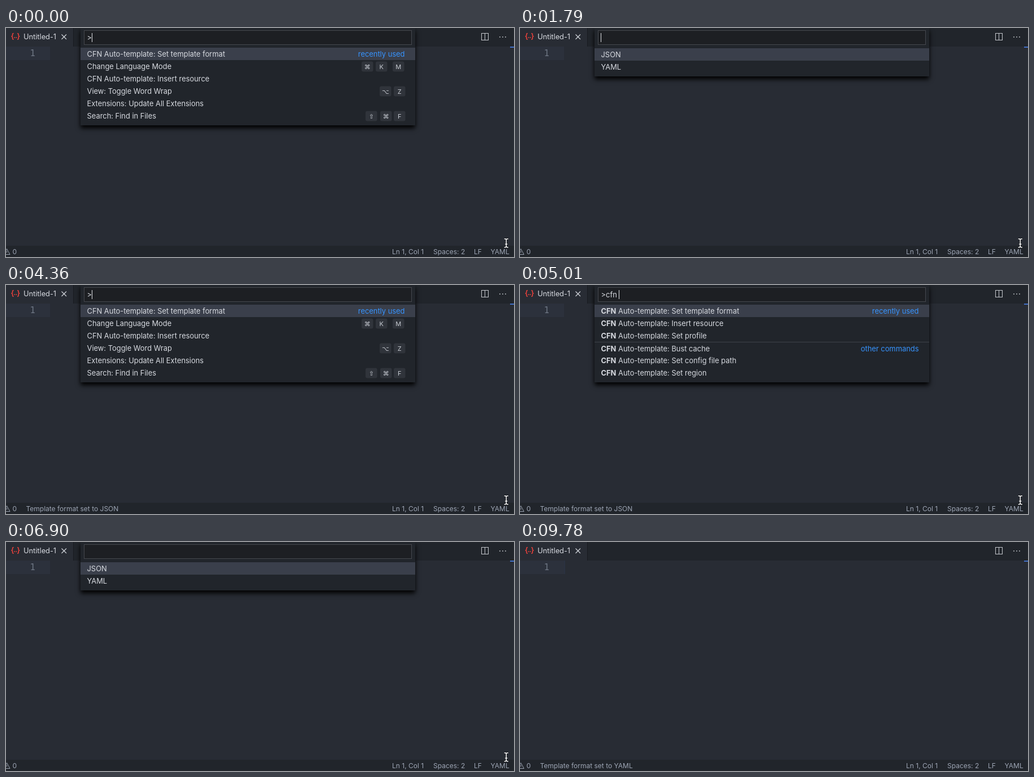
Animation, 900 px wide and 407 px high, one loop 9.88 s. Source, as an HTML page with a canvas:

```html
<!DOCTYPE html>
<html lang="en">
<head>
<meta charset="utf-8">
<title>Command palette</title>
<style>
html, body { margin: 0; width: 100%; height: 100%; overflow: hidden; background: #282c34; }
canvas { display: block; width: 900px; height: 407px; }
</style>
</head>
<body>
<canvas id="stage" width="900" height="407"></canvas>
<script>
const ctx = document.getElementById('stage').getContext('2d');
const LOOP = 9880;
const UI = 'Inter, "Liberation Sans", sans-serif';
const SYMBOL = '"DejaVu Sans", sans-serif';
const MONO = '"DejaVu Sans Mono", monospace';
const C = {
  editor: '#282c34', bar: '#21252b', line: '#2c313c', edge: '#181a1f',
  field: '#1d1f23', fieldEdge: '#45484e', selected: '#3a3f4b', rule: '#3e4249',
  text: '#d7dae0', status: '#9da5b4', link: '#3794ff', caret: '#528bff', key: '#30343b'
};

const CFN = 'CFN Auto-template: ';
const format = { label: CFN + 'Set template format', note: 'recently used' };
const insert = { label: CFN + 'Insert resource' };
const profile = { label: CFN + 'Set profile' };
const bust = { label: CFN + 'Bust cache', note: 'other commands', rule: true };
const language = { label: 'Change Language Mode', keys: [['⌘', 630], ['K', 655], ['M', 685]] };
const search = { label: 'Search: Find in Files', keys: [['⇧', 637], ['⌘', 663], ['F', 687]] };

const START = [
  format, language, insert,
  { label: 'View: Toggle Word Wrap', keys: [['⌥', 662], ['Z', 687]] },
  { label: 'Extensions: Update All Extensions' },
  search
];
const FIRST = [format, language, insert, search, profile, bust];
const MATCHED = [
  format, insert, profile, bust,
  { label: CFN + 'Set config file path' },
  { label: CFN + 'Set region' }
];

function rect(x, y, w, h, color) {
  ctx.fillStyle = color;
  ctx.fillRect(x, y, w, h);
}

function text(str, x, y, { size = 12.9, weight = 400, color = C.text, family = UI, align = 'left' } = {}) {
  ctx.font = `${weight} ${size}px ${family}`;
  ctx.textAlign = align;
  ctx.fillStyle = color;
  ctx.fillText(str, x, y);
  return ctx.measureText(str).width;
}

function stroke(points, color, width = 1) {
  ctx.beginPath();
  points.forEach(([x, y], i) => i ? ctx.lineTo(x, y) : ctx.moveTo(x, y));
  ctx.strokeStyle = color;
  ctx.lineWidth = width;
  ctx.stroke();
}

function dot(x, y, r, color) {
  ctx.beginPath();
  ctx.arc(x, y, r, 0, Math.PI * 2);
  ctx.fillStyle = color;
  ctx.fill();
}

function drawTabs() {
  rect(0, 0, 900, 33, C.bar);
  rect(0, 0, 119, 33, C.editor);
  rect(119, 0, 1, 33, C.edge);
  const brace = { size: 13, weight: 600, color: '#ee423c' };
  text('{', 8.5, 18.5, brace);
  text('}', 19.2, 18.5, brace);
  dot(15.2, 17, 0.9, brace.color);
  dot(18.2, 17, 0.9, brace.color);
  text('Untitled-1', 31, 20, { size: 12.8 });
  stroke([[98.5, 11.5], [107, 20]], C.text, 1.1);
  stroke([[107, 11.5], [98.5, 20]], C.text, 1.1);
  ctx.strokeStyle = '#c5c8cd';
  ctx.lineWidth = 1;
  ctx.strokeRect(842.5, 9.5, 12, 12);
  stroke([[848.5, 9], [848.5, 22]], '#c5c8cd');
  for (const x of [875, 880, 885]) dot(x, 16, 0.9, '#c5c8cd');
}

function drawStatus(message) {
  const style = { size: 12, color: C.status };
  rect(0, 387, 900, 20, C.bar);
  stroke([[-4, 402.5], [1.5, 392.5], [7, 402.5], [-4, 402.5]], C.status);
  stroke([[1.5, 396], [1.5, 399.5]], C.status);
  text('0', 11.5, 402, style);
  text(message, 35.5, 402, style);
  text('Ln 1, Col 1', 684, 402, style);
  text('Spaces: 2', 757, 402, style);
  text('LF', 829, 402, style);
  text('YAML', 858.5, 402, style);
}

function drawEditor(caret) {
  rect(0, 0, 900, 407, C.editor);
  rect(0, 33, 78, 24, C.line);
  text('1', 42.5, 50, { size: 15.5, color: '#6f7785', family: MONO });
  rect(893, 33, 7, 2, '#4270c8');
  ctx.globalAlpha = caret;
  rect(78, 33, 2, 24, C.caret);
  ctx.globalAlpha = 1;
}

function drawKey([glyph, x], y) {
  ctx.beginPath();
  ctx.roundRect(x, y + 2.5, 20.5, 18, 3);
  ctx.fillStyle = C.key;
  ctx.fill();
  const family = glyph > 'Z' ? SYMBOL : UI;
  text(glyph, x + 10.3, y + 15.5, { size: 11, family, align: 'center', color: '#c8ccd3' });
}

// Splits a label into plain and bold runs for the typed words.
function runs(label, query) {
  const [word, rest = ''] = query.split(' ');
  const marks = [[label.toLowerCase().indexOf(word), word.length]];
  if (rest) marks.push([label.indexOf('-' + rest) + 1, rest.length]);
  const out = [];
  let end = 0;
  for (const [at, n] of marks) {
    out.push([label.slice(end, at), 400], [label.slice(at, at + n), 700]);
    end = at + n;
  }
  return [...out, [label.slice(end), 400]];
}

function drawRow(item, y, query) {
  if (item.rule && query) {
    rect(132, y, 593, 1, C.rule);
    y += 1;
  }
  let x = 143.5;
  for (const [part, weight] of runs(item.label, query)) {
    if (part) x += text(part, x, y + 16, { weight });
  }
  if (item.note) text(item.note, 706.5, y + 16, { color: C.link, align: 'right' });
  if (item.keys) item.keys.forEach(key => drawKey(key, y));
}

function drawPalette({ input, items, query = '', selected = 0, caret, slider, top, height }) {
  ctx.save();
  ctx.shadowColor = '#000';
  ctx.shadowBlur = 8;
  ctx.shadowOffsetY = 5;
  rect(132, 0, 593, height, C.bar);
  ctx.restore();
  rect(138, 4, 581, 26, C.fieldEdge);
  rect(139, 5, 579, 24, C.field);
  const width = text(input, 143.5, 21.5);
  if (caret) rect(Math.floor(143.5 + width), 9, 1, 16, '#e0e2e6');

  rect(132, top + selected * 22, 593, 22, C.selected);
  items.forEach((item, i) => drawRow(item, top + i * 22, query));
  if (slider) rect(715, 36, 10, 112, 'rgba(78,86,102,0.38)');
}

function drawPointer(dx, dy) {
  ctx.save();
  ctx.translate(dx, dy);
  for (const [color, width] of [['#15171b', 3], ['#ffffff', 1.5]]) {
    stroke([[882.8, 374.7], [885, 374.7], [886.3, 376], [887.6, 374.7], [889.8, 374.7]], color, width);
    stroke([[882.8, 389.7], [885, 389.7], [886.3, 388.4], [887.6, 389.7], [889.8, 389.7]], color, width);
    stroke([[886.3, 376], [886.3, 388.4]], color, width);
    stroke([[884.3, 384.2], [888.3, 384.2]], color, width);
  }
  ctx.restore();
}

function commands(query, caret, slider) {
  const items = query.length > 1 ? MATCHED : query ? FIRST : START;
  return { input: '>' + query, items, query, caret, slider, top: 35, height: 173 };
}

function formats(caret, selected) {
  const items = [{ label: 'JSON' }, { label: 'YAML' }];
  return { input: '', items, selected, caret, top: 36, height: 86 };
}

// Number of typed characters: [time, length] pairs.
const TYPING_A = [[540, 1], [620, 2], [720, 4], [840, 5], [900, 6], [960, 7]];
const TYPING_B = Array.from({ length: 8 }, (_, i) => [4710 + i * 84, i + 1]);

function typed(t, steps) {
  let n = 0;
  for (const [at, length] of steps) if (t >= at) n = length;
  return 'cfn temp'.slice(0, n);
}

function paletteAt(t) {
  if (t < 1730) return commands(typed(t, TYPING_A), t < 180 || (t >= 540 && t < 1500), t >= 1500);
  if (t >= 1790 && t < 2860) return formats(t < 2270 || t >= 2800, 0);
  if (t >= 4360 && t < 6310) return commands(typed(t, TYPING_B), t < 5840, t >= 5840);
  if (t >= 6370 && t < 7620) return formats(t < 6790 || t >= 7380, t < 7080 ? 0 : 1);
  return null;
}

// Smooth blink of the editor caret, in four steps per fade.
const FADES = [[3510, 0], [3910, 1], [8330, 0], [8730, 1], [9320, 0], [9720, 1]];

function caretAt(t) {
  let alpha = 1;
  for (const [start, to] of FADES) {
    if (t < start) break;
    const x = Math.min(4, Math.floor((t - start) / 54) + 1) / 4;
    alpha = to ? x ** 4 : (1 - x) ** 3;
  }
  return alpha;
}

function messageAt(t) {
  if (t >= 2920 && t < 6900) return 'Template format set to JSON';
  return t >= 7680 ? 'Template format set to YAML' : '';
}

function draw(t) {
  const palette = paletteAt(t);
  drawEditor(palette ? 0 : caretAt(t));
  drawTabs();
  drawStatus(messageAt(t));
  if (palette) drawPalette(palette);
  if (t < 9190) drawPointer(0, 0);
  else if (t < 9250) drawPointer(4, 15);
}

const begin = performance.now();
function frame() {
  draw((performance.now() - begin) % LOOP);
  requestAnimationFrame(frame);
}
frame();
</script>
</body>
</html>
```
